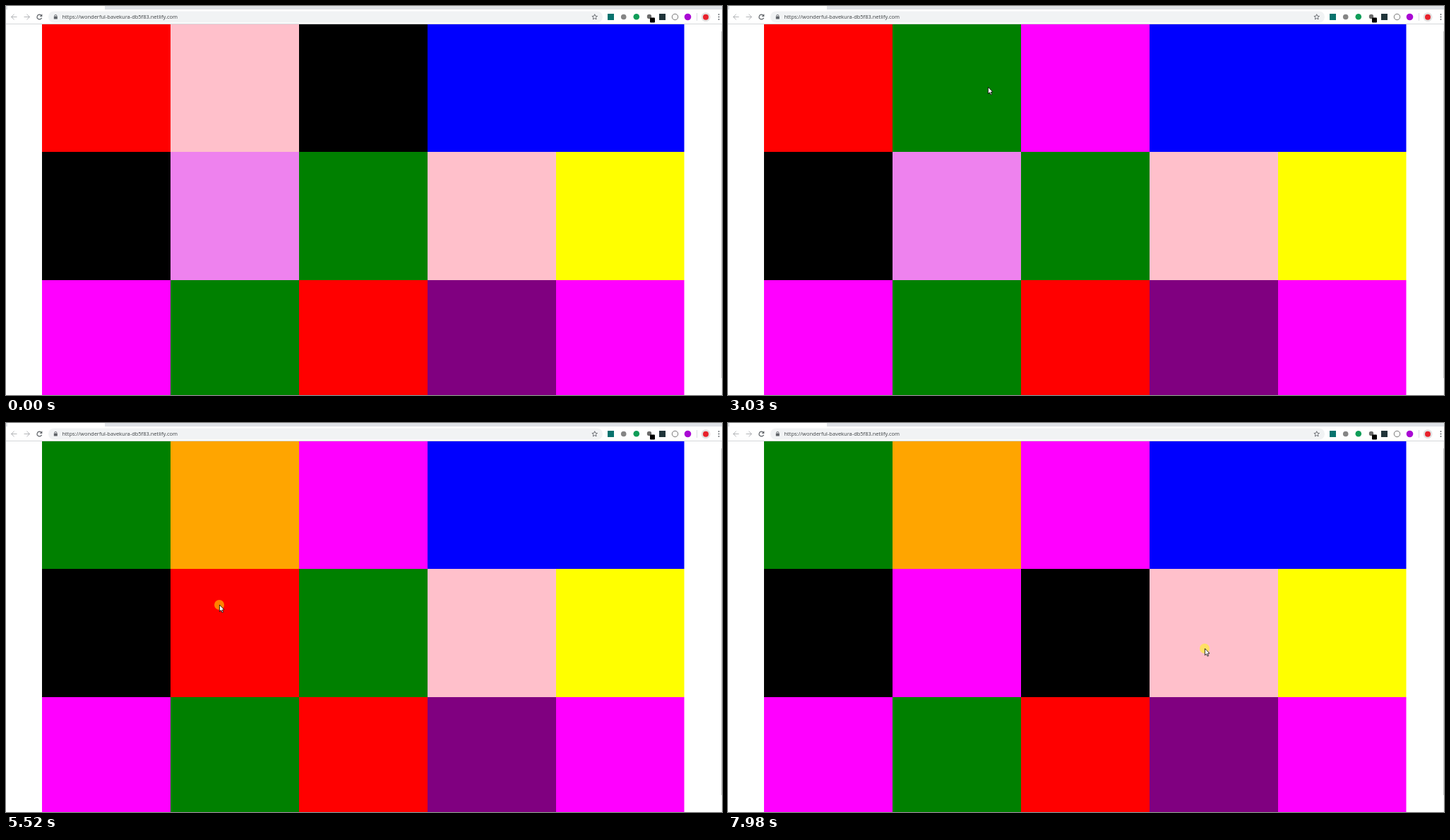
Animation, 1014 px wide and 552 px high, one loop 8 s. Source, as an HTML page with a canvas:

```html
<!DOCTYPE html>
<html lang="en">
<head>
<meta charset="utf-8">
<title>Colour tiles</title>
<style>
  html, body { margin: 0; width: 100%; height: 100%; overflow: hidden; background: #fff; }
  canvas { display: block; }
</style>
</head>
<body>
<canvas id="stage" width="1014" height="552"></canvas>
<script>
const ctx = document.getElementById('stage').getContext('2d');
const LOOP = 8000, STEP = 78;
const COLS = [51, 233, 415, 597, 779, 960.5];
const ROWS = [26, 207, 389, 552];
const START = [
  'red', 'pink', 'black', 'blue', 'blue',
  'black', 'violet', 'green', 'pink', 'yellow',
  'magenta', 'green', 'red', 'purple', 'magenta'
];

// press time, release time, tile, colour set on release
const CLICKS = [
  [1090, 1260, 2, 'violet'], [1550, 1630, 2, 'green'], [2100, 2270, 2, 'magenta'],
  [2870, 3030, 1, 'green'], [3190, 3350, 1, 'orange'],
  [3810, 3890, 0, 'purple'], [4270, 4430, 0, 'green'],
  [4760, 4910, 6, 'blue'], [5060, 5140, 6, 'orange'], [5290, 5370, 6, 'red'],
  [5520, 5600, 6, 'yellow'], [5770, 5920, 6, 'green'], [6070, 6230, 6, 'black'],
  [6390, 6460, 6, 'magenta'], [7300, 7460, 7, 'black'], [7980, 8100, 8, 'red']
];

// time, x, y of the pointer tip
const PATH = [
  [190, 947, 535], [490, 640, 265], [720, 383, 128], [950, 448, 115], [1090, 472, 114],
  [1630, 472, 114], [1790, 405, 116], [2020, 465, 114], [2570, 465, 114],
  [2870, 368, 115], [3350, 368, 115], [3660, 168, 126],
  [4430, 168, 126], [4680, 302, 258], [6460, 302, 258],
  [6740, 564, 300], [6980, 404, 311], [7150, 502, 309], [7300, 515, 308],
  [7540, 515, 308], [7900, 675, 320]
];

function pointerAt(t) {
  const i = PATH.findLastIndex(p => p[0] <= t);
  if (i < 0) return null;
  const [t0, x0, y0] = PATH[i];
  if (i === PATH.length - 1) return [x0, y0];
  const [t1, x1, y1] = PATH[i + 1];
  const k = Math.floor((t - t0) / STEP) * STEP / (t1 - t0);
  const e = k * (2 - k);
  return [x0 + (x1 - x0) * e, y0 + (y1 - y0) * e];
}

function rect(x, y, w, h, color) {
  ctx.fillStyle = color;
  ctx.fillRect(x, y, w, h);
}

function disc(x, y, r, color) {
  ctx.fillStyle = color;
  ctx.beginPath();
  ctx.arc(x, y, r, 0, Math.PI * 2);
  ctx.fill();
}

function pill(x, y, w, h, r, color) {
  ctx.fillStyle = color;
  ctx.beginPath();
  ctx.roundRect(x, y, w, h, r);
  ctx.fill();
}

function trace(points, close) {
  ctx.beginPath();
  points.forEach(([x, y]) => ctx.lineTo(x, y));
  if (close) ctx.closePath();
}

function stroke(color, width) {
  ctx.strokeStyle = color;
  ctx.lineWidth = width;
  ctx.stroke();
}

function arrow(x, dir, color) {
  trace([[x - 4 * dir, 15.5], [x + 4 * dir, 15.5]]);
  stroke(color, 1);
  trace([[x, 11.7], [x + 4 * dir, 15.5], [x, 19.3]]);
  stroke(color, 1);
}

function drawNavigation() {
  arrow(11.5, -1, '#b4b6b9');
  arrow(29.5, 1, '#b4b6b9');
  ctx.beginPath();
  ctx.arc(47.5, 15.5, 3.4, 0.4, 5.4);
  stroke('#5f6368', 1.2);
  ctx.fillStyle = '#5f6368';
  trace([[51.3, 11.3], [51.3, 15], [47.6, 15]], true);
  ctx.fill();
}

function drawAddress() {
  pill(60, 7.5, 785, 16, 8, '#f1f3f4');
  rect(67.8, 14.5, 5, 4, '#5f6368');
  ctx.beginPath();
  ctx.arc(70.3, 14, 1.6, Math.PI, 0);
  stroke('#5f6368', 0.9);
  ctx.font = '7.5px "Open Sans", "Noto Sans", sans-serif';
  ctx.fillStyle = '#3c4043';
  ctx.fillText('https://wonderful-bavekura-db5f83.netlify.com', 79.5, 18.2);
  const star = Array.from({ length: 10 }, (_, i) => {
    const a = i * Math.PI / 5 - Math.PI / 2, r = i % 2 ? 1.8 : 4;
    return [833.7 + r * Math.cos(a), 15.7 + r * Math.sin(a)];
  });
  trace(star, true);
  stroke('#5f6368', 0.9);
}

function drawExtensions() {
  rect(852, 11, 9, 9, '#08736e');
  disc(874.7, 15.5, 3.8, '#858585');
  disc(892.8, 15.3, 4.3, '#0f9d58');
  disc(911, 15, 3.2, '#6b6b6b');
  pill(912, 16.5, 7, 7, 1, '#000');
  rect(925, 11, 9, 9, '#20343a');
  ctx.beginPath();
  ctx.arc(947.5, 15.5, 4.2, 0, Math.PI * 2);
  stroke('#666', 0.9);
  disc(965.5, 15.5, 4.8, '#a908d4');
  rect(978, 10, 1, 11, '#dadce0');
  disc(991, 15.7, 6.5, '#e2e2e2');
  disc(991, 15.7, 4, '#e8212b');
  [12, 15.5, 19].forEach(y => disc(1009.5, y, 0.95, '#5f6368'));
}

function drawBrowser() {
  rect(0, 0, 1014, 552, '#fff');
  rect(0, 0, 1014, 5, '#dee1e6');
  pill(2, -6, 138, 14, 3, '#fff');
  rect(0, 5, 1014, 20, '#fff');
  rect(0, 25, 1014, 1, '#d5d7da');
  drawNavigation();
  drawAddress();
  drawExtensions();
  rect(1013, 26, 1, 526, '#f1f1f1');
  rect(1013, 36, 1, 492, '#c1c1c1');
}

function drawTiles(t) {
  const colors = START.slice();
  for (const [, release, tile, color] of CLICKS) {
    if (t >= release) colors[tile] = color;
  }
  colors.forEach((color, i) => {
    const c = i % 5, r = Math.floor(i / 5);
    rect(COLS[c], ROWS[r], COLS[c + 1] - COLS[c], ROWS[r + 1] - ROWS[r], color);
  });
}

function drawPointer(t) {
  const tip = pointerAt(t);
  if (!tip) return;
  const [x, y] = tip.map(Math.round);
  if (CLICKS.some(([press, release]) => t >= press && t < release)) {
    disc(x, y, 7, 'rgba(255, 255, 0, 0.5)');
  }
  ctx.save();
  ctx.translate(x + 0.4, y);
  trace([[0, 0], [0, 9.6], [2.2, 7.6], [3.7, 11], [5.2, 10.3], [3.8, 7.1], [6.6, 6.9]], true);
  ctx.fillStyle = '#fff';
  ctx.fill();
  stroke('#000', 0.8);
  ctx.restore();
}

function frame(now) {
  const t = now % LOOP;
  drawBrowser();
  drawTiles(t);
  drawPointer(t);
  requestAnimationFrame(frame);
}
requestAnimationFrame(frame);
</script>
</body>
</html>
```
